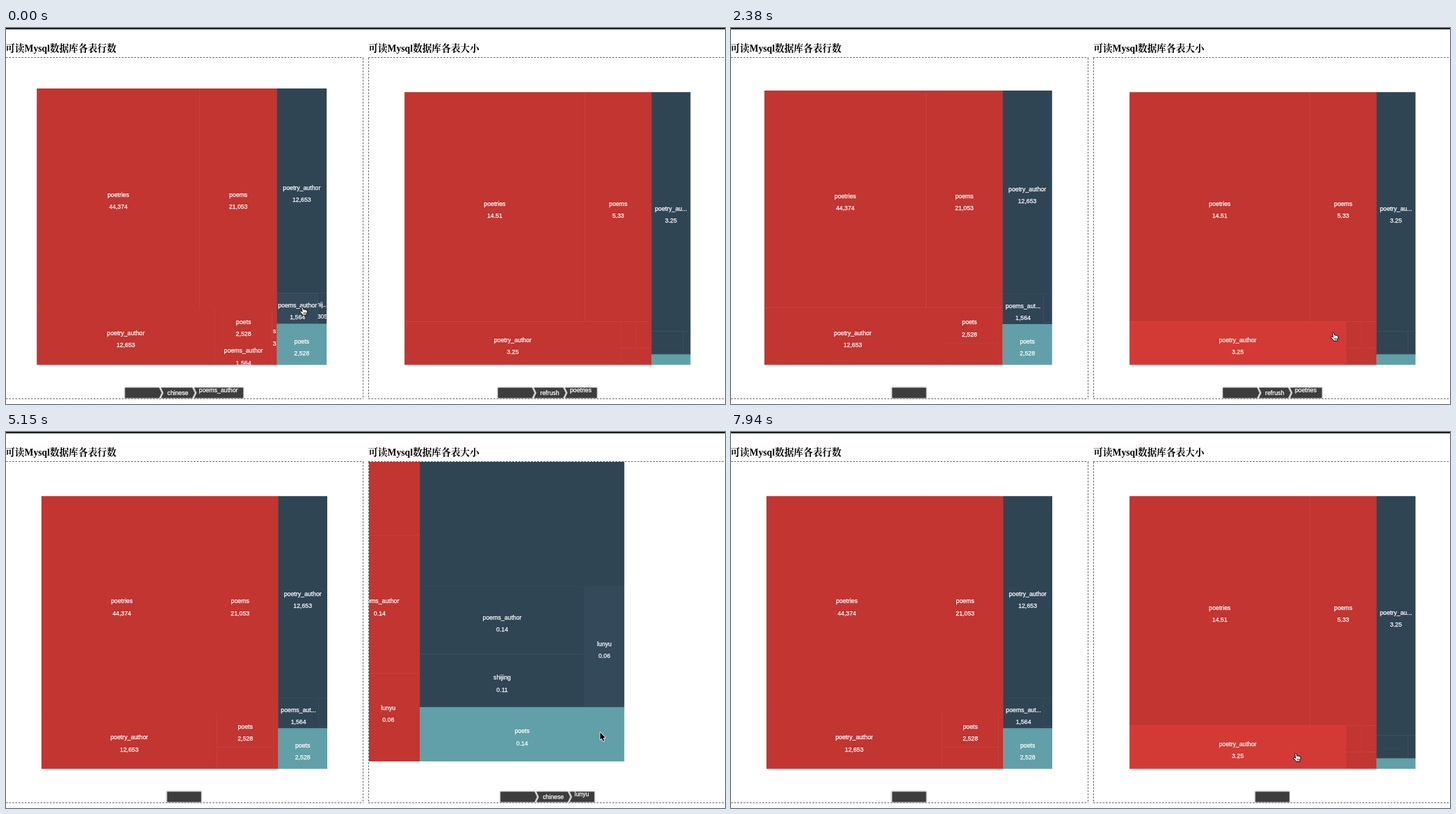
These frames come from a looping animation (1034 by 541 pixels, 8 s). An HTML page with a canvas:

```html
<!DOCTYPE html>
<html lang="zh-CN">
<head>
<meta charset="utf-8">
<title>Treemap zoom</title>
<style>
  html, body { margin: 0; width: 100%; height: 100%; overflow: hidden; background: #fff; }
  canvas { display: block; }
</style>
</head>
<body>
<canvas id="stage" width="1034" height="541"></canvas>
<script>
const ctx = document.getElementById('stage').getContext('2d');
const LOOP = 8000;
const RED = '#c23531', DARK = '#2f4554', TEAL = '#61a0a8';
const HOVER = { [RED]: '#d33a35', [DARK]: '#34495a' };
const FONT = '8.75px "Liberation Sans", Arial, sans-serif';

const TICKS = [0, 180, 470, 640, 810, 980, 1150, 1320, 1490, 1640, 1790, 1940, 2150, 2380,
  2650, 2855, 3060, 3510, 3680, 3850, 4010, 4190, 4355, 4520, 4820, 4990, 5150, 5320, 5490,
  5660, 5830, 5980, 6130, 6280, 6430, 6570, 7010, 7200, 7380, 7570, 7750, 7940];

// Cell: x0, y0, x1, y1, colour, name, value, label at rest (empty = hidden)
const left = {
  clip: [0, 43, 513, 490], crumbX: 256.2, right: 462, bottom: 484.5,
  views: { home: [462, 484.5, 1], author: [361.5, 491.8, 2.54] },
  zooms: [[-224, 1000, 'home', 'author'], [1669, 878, 'author', 'home']],
  modes: [[0, 'near'], [1790, 'far']],
  crumbs: [[0, ['chinese', 'poems_author']], [1790, []]],
  hovers: [[0, 8], [470, -1]],
  cells: [
    [51, 92.4, 282.1, 403.1, RED, 'poetries', '44,374', 'poetries'],
    [282.1, 92.4, 391.4, 403.1, RED, 'poems', '21,053', 'poems'],
    [51, 403.1, 303.4, 484.5, RED, 'poetry_author', '12,653', 'poetry_author'],
    [303.4, 403.1, 384.8, 453.4, RED, 'poets', '2,528', 'poets'],
    [303.4, 453.4, 384.8, 484.5, RED, 'poems_author', '1,564', ''],
    [384.8, 403.1, 391.4, 479.4, RED, 's', '3', ''],
    [384.8, 479.4, 391.4, 484.5, RED, '', '', ''],
    [391.4, 92.4, 462, 382.9, DARK, 'poetry_author', '12,653', 'poetry_author'],
    [391.4, 382.9, 449.9, 426.4, DARK, 'poems_author', '1,564', 'poems_aut...'],
    [449.9, 382.9, 462, 423.8, DARK, 'hij...', '305', ''],
    [449.9, 423.8, 462, 426.4, DARK, '', '', ''],
    [391.4, 426.4, 462, 484.5, TEAL, 'poets', '2,528', 'poets']
  ]
};

const right = {
  clip: [522, 43, 512, 490], crumbX: 778.6, right: 984.3, bottom: 484.5,
  views: { home: [984.3, 484.5, 1], author: [927.2, 459.6, 4.45], lunyu: [815.4, 501.5, 6.8] },
  zooms: [[3379, 1000, 'home', 'author'], [4687, 1000, 'author', 'lunyu'], [6890, 1000, 'lunyu', 'home']],
  modes: [[0, 'far'], [3510, 'near'], [7010, 'far']],
  crumbs: [[0, ['refrush', 'poetries']], [3510, ['chinese', 'poems_author']],
    [4820, ['chinese', 'lunyu']], [7010, []]],
  hovers: [[0, -1], [2380, 2], [2855, -1], [3510, 9], [3850, -1], [4355, 11], [5320, -1], [7750, 2]],
  cells: [
    [573.2, 92.4, 832.5, 422.5, RED, 'poetries', '14.51', 'poetries'],
    [832.5, 92.4, 928.3, 422.5, RED, 'poems', '5.33', 'poems'],
    [573.2, 422.5, 884.3, 484.5, RED, 'poetry_author', '3.25', 'poetry_author'],
    [884.3, 422.5, 906.3, 460.4, RED, 'poets', '0.14', ''],
    [906.3, 422.5, 928.3, 460.4, RED, 'poems_author', '0.14', ''],
    [884.3, 460.4, 911, 484.5, RED, 'shijing', '0.11', ''],
    [911, 460.4, 928.3, 481.1, RED, 'lunyu', '0.06', ''],
    [911, 481.1, 928.3, 484.5, RED, '', '', ''],
    [928.3, 92.4, 984.3, 436.7, DARK, 'poetry_author', '3.25', 'poetry_au...'],
    [928.3, 436.7, 973.4, 455.1, DARK, 'poems_author', '0.14', ''],
    [928.3, 455.1, 973.4, 469.65, DARK, 'shijing', '0.11', ''],
    [973.4, 436.7, 984.3, 469.65, DARK, 'lunyu', '0.06', ''],
    [928.3, 469.65, 984.3, 484.5, TEAL, 'poets', '0.14', '']
  ]
};

// Pointer: time, centre x, centre y, shape from then on
const POINTER = [
  [0, 428, 407, 'hand'], [180, 428, 408, 'hand'], [470, 424, 424, 'hand'],
  [810, 350, 505, 'arrow'], [1150, 245, 533, 'hand'], [1490, 201, 527, 'hand'],
  [1790, 205, 525, 'hand'], [1940, 397.5, 501, 'arrow'], [2380, 868, 444, 'hand'],
  [3060, 957, 454, 'hand'], [3680, 955, 452, 'hand'], [4010, 933, 440.5, 'arrow'],
  [4355, 906, 350, 'hand'], [4820, 906, 350, 'hand'], [5150, 857.5, 438.5, 'arrow'],
  [5830, 776, 519, 'hand'], [6570, 755, 528, 'hand'], [7010, 755, 528, 'hand'],
  [7200, 765, 514, 'arrow'], [7570, 793, 485, 'hand'], [7940, 814, 468, 'hand']
];

const lerp = (a, b, p) => a + (b - a) * p;
const current = (list, t) => list.filter(e => e[0] <= t).pop();

function quintic(t) {
  t = Math.min(1, Math.max(0, t));
  return t < 0.5 ? 16 * t ** 5 : 1 - 16 * (1 - t) ** 5;
}

function viewAt(pane, t) {
  const zoom = current(pane.zooms, t);
  if (!zoom) return pane.views.home;
  const [start, length, from, to] = zoom;
  const p = quintic((t - start) / length);
  return pane.views[from].map((v, i) => lerp(v, pane.views[to][i], p));
}

// A hairline stroke gives the labels their slightly heavy smoothing.
function text(str, x, y) {
  ctx.fillStyle = ctx.strokeStyle = '#fff';
  ctx.lineWidth = 0.25;
  ctx.fillText(str, x, y);
  ctx.strokeText(str, x, y);
}

function clipTo(x, y, w, h) {
  ctx.save();
  ctx.beginPath();
  ctx.rect(x, y, w, h);
  ctx.clip();
}

function drawTreemap(pane, t) {
  const [r, b, s] = viewAt(pane, t);
  const mode = current(pane.modes, t)[1];
  const hover = current(pane.hovers, t)[1];
  clipTo(...pane.clip);
  const boxes = pane.cells.map(c => [
    r + (c[0] - pane.right) * s, b + (c[1] - pane.bottom) * s, (c[2] - c[0]) * s, (c[3] - c[1]) * s
  ]);
  // A translucent overlap under the cells softens the seams between them.
  ctx.globalAlpha = 0.6;
  boxes.forEach(([x, y, w, h], i) => {
    ctx.fillStyle = pane.cells[i][4];
    ctx.fillRect(x, y, Math.min(w + 1, r - x), Math.min(h + 1, b - y));
  });
  ctx.globalAlpha = 1;
  boxes.forEach((box, i) => {
    const color = pane.cells[i][4];
    ctx.fillStyle = i === hover ? HOVER[color] : color;
    ctx.fillRect(...box);
  });
  boxes.forEach(([x, y, w, h], i) => {
    const [, , , , , name, value, short] = pane.cells[i];
    const label = mode === 'near' ? name : short;
    if (!label) return;
    clipTo(x, y, w, h);
    text(label, x + w / 2, y + h / 2 - 4);
    text(value, x + w / 2, y + h / 2 + 13.4);
    ctx.restore();
  });
  ctx.restore();
}

function drawCrumbs(pane, t) {
  const names = ['', ...current(pane.crumbs, t)[1]];
  const gap = 5.85, arrow = 3.66, top = 517.2, h = 15.6;
  const widths = names.map(n => n ? ctx.measureText(n).width + 11.7 : 49.5);
  let x = pane.crumbX - (widths.reduce((a, w) => a + w, 0) + gap * (names.length - 1)) / 2;
  names.forEach((name, i) => {
    const w = widths[i], first = i === 0, last = i === names.length - 1;
    const x0 = first ? x : x - arrow;
    ctx.beginPath();
    ctx.moveTo(x0, top);
    ctx.lineTo(x + w, top);
    if (!last) ctx.lineTo(x + w + arrow, top + h / 2);
    ctx.lineTo(x + w, top + h);
    ctx.lineTo(x0, top + h);
    if (!first) ctx.lineTo(x, top + h / 2);
    ctx.closePath();
    ctx.save();
    ctx.shadowColor = '#969696';
    ctx.shadowBlur = 2.5;
    ctx.fillStyle = '#3d3d3d';
    ctx.fill();
    ctx.restore();
    ctx.strokeStyle = 'rgba(255,255,255,0.6)';
    ctx.lineWidth = 0.75;
    ctx.stroke();
    if (name) text(name, x + w / 2 - (last ? 2.2 : 0), last ? 521.2 : 525.2);
    x += w + gap;
  });
}

function drawPage() {
  ctx.fillStyle = '#fff';
  ctx.fillRect(0, 0, 1034, 541);
  ctx.fillStyle = '#202124';
  ctx.fillRect(0, 0, 1034, 2);

  ctx.fillStyle = '#000';
  ctx.font = 'bold 13.68px "Liberation Serif", "Noto Serif CJK SC", "Noto Sans CJK SC", "Noto Sans CJK", serif';
  ctx.textAlign = 'left';
  ctx.textBaseline = 'alphabetic';
  ctx.fillText('可读Mysql数据库各表行数', -0.8, 34);
  ctx.fillText('可读Mysql数据库各表大小', 521.2, 34);

  ctx.strokeStyle = '#666';
  ctx.lineWidth = 1;
  ctx.setLineDash([2.6, 1.9]);
  ctx.beginPath();
  for (const [x0, x1, side] of [[0, 514, 513.5], [521, 1034, 521.5]]) {
    for (const y of [42.5, 533.5]) {
      ctx.moveTo(x0, y);
      ctx.lineTo(x1, y);
    }
    ctx.moveTo(side, 43);
    ctx.lineTo(side, 533);
  }
  ctx.stroke();
  ctx.setLineDash([]);
}

const ARROW = new Path2D('M-3 -6.5V4.2L-.7 2.1L1 6.2L2.8 5.4L1.1 1.5H4.4Z');
const HAND = new Path2D('M-3 -5.2Q-2.2 -6.6 -1.2 -5.2L-.1 -1.8Q1 -2.6 1.7 -1.5Q2.8 -2.2 3.4 -1' +
  'Q4.9 -1.4 5.1 .2Q5.5 2.6 4.3 4.2V6H-1.2Q-2.6 3.8 -5 1.5Q-5 0 -3.4 .4L-1.9 1.3Z');

function drawPointer(t) {
  const i = POINTER.filter(k => k[0] <= t).length - 1;
  const a = POINTER[i], b = POINTER[i + 1] || a;
  const p = b === a ? 0 : (t - a[0]) / (b[0] - a[0]);
  const hand = a[3] === 'hand';
  ctx.save();
  ctx.translate(lerp(a[1], b[1], p), lerp(a[2], b[2], p));
  ctx.lineJoin = 'round';
  ctx.lineWidth = hand ? 1 : 1.6;
  ctx.strokeStyle = hand ? '#000' : '#fff';
  ctx.fillStyle = hand ? '#fff' : '#000';
  const shape = hand ? HAND : ARROW;
  ctx.stroke(shape);
  ctx.fill(shape);
  if (hand) {
    ctx.lineWidth = 0.7;
    ctx.stroke(shape);
    ctx.beginPath();
    for (const x of [0.2, 1.8, 3.3]) {
      ctx.moveTo(x, 2);
      ctx.lineTo(x, 4.6);
    }
    ctx.stroke();
  }
  ctx.restore();
}

function draw(now) {
  const t = TICKS.filter(k => k <= now % LOOP).pop() || 0;
  drawPage();
  ctx.font = FONT;
  ctx.textAlign = 'center';
  ctx.textBaseline = 'middle';
  ctx.lineJoin = 'round';
  for (const pane of [left, right]) {
    drawTreemap(pane, t);
    drawCrumbs(pane, t);
  }
  drawPointer(t);
}

const begin = performance.now();
function loop() {
  draw(performance.now() - begin);
  requestAnimationFrame(loop);
}
loop();
</script>
</body>
</html>
```
